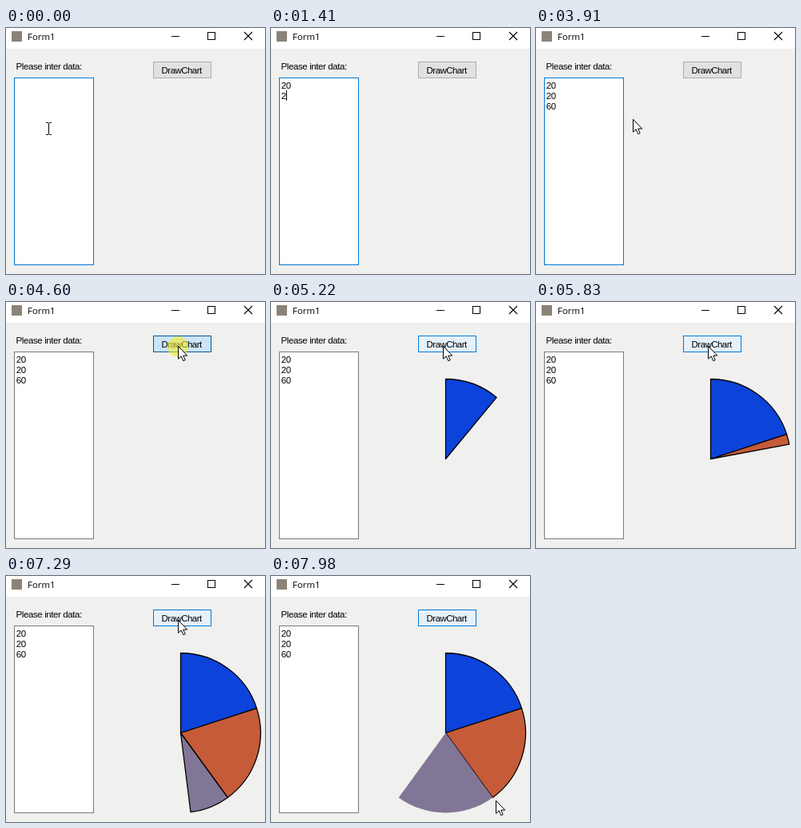
Write an HTML page with a canvas that moves like this. It is 324 by 308 pixels and loops after 8000 ms.

```html
<!DOCTYPE html>
<html lang="en">
<head>
<meta charset="utf-8">
<title>Form1</title>
<style>
  html, body { margin: 0; width: 324px; height: 308px; overflow: hidden; background: #f0f0ef; }
  canvas { display: block; }
</style>
</head>
<body>
<canvas id="stage" width="324" height="308"></canvas>
<script>
const ctx = document.getElementById('stage').getContext('2d');
const LOOP = 8000;
const TEXT_FONT = '11.5px "Liberation Sans", sans-serif';
const COLORS = ['#0b43db', '#c55b39', '#827696'];
const CENTER = [218.5, 196.5], RADIUS = 100, SLICE = 72;

// time, text, caret visible
const TYPING = [
  [0, '', false], [170, '2', true], [400, '20', true], [840, '20', false],
  [1090, '20\n', true], [1410, '20\n2', true], [1640, '20\n20', true],
  [2110, '20\n20', false], [2490, '20\n20\n', true], [2890, '20\n20\n6', true],
  [3380, '20\n20\n60', true], [3910, '20\n20\n60', false]
];

// drawing step, total sweep in degrees
const SWEEP = [[0, 0], [10, 49.5], [16, 79.4], [21, 103.3], [24, 117.7],
  [32, 158.4], [35, 172.8], [43, 213.7], [44, 218.9]];

const clamp01 = v => Math.min(1, Math.max(0, v));
const lerp = (a, b, u) => a + (b - a) * u;
const drawStep = t => Math.floor((t - 4600) / 76.8 + 0.1);

function sweepAt(step) {
  const k = SWEEP.findIndex(p => p[0] >= step);
  if (k < 0) return SWEEP[SWEEP.length - 1][1];
  if (k === 0) return 0;
  const [a, b] = [SWEEP[k - 1], SWEEP[k]];
  return lerp(a[1], b[1], (step - a[0]) / (b[0] - a[0]));
}

function box(x, y, w, h, fill, border) {
  ctx.fillStyle = border;
  ctx.fillRect(x, y, w, h);
  ctx.fillStyle = fill;
  ctx.fillRect(x + 1, y + 1, w - 2, h - 2);
}

function label(text, x, y, font = TEXT_FONT, spacing = -0.4) {
  ctx.font = font;
  ctx.letterSpacing = spacing + 'px';
  ctx.fillStyle = '#000';
  ctx.fillText(text, x, y);
}

function polyline(points, width = 1) {
  ctx.beginPath();
  points.forEach(([x, y]) => ctx.lineTo(x, y));
  ctx.lineWidth = width;
  ctx.strokeStyle = '#000';
  ctx.stroke();
}

function titleBar() {
  ctx.fillStyle = '#fff';
  ctx.fillRect(0, 0, 324, 26);
  ctx.fillStyle = '#8b8377';
  ctx.fillRect(7, 4, 13, 13);
  label('Form1', 27, 15, '11.4px "Open Sans", sans-serif', 0);
  polyline([[207, 10.5], [217, 10.5]]);
  ctx.strokeRect(252.5, 5.5, 9, 9);
  polyline([[298, 5], [308, 15]], 1.1);
  polyline([[308, 5], [298, 15]], 1.1);
}

function textBox(t) {
  box(10, 62, 100, 235, '#fff', t < 4600 ? '#0078d7' : '#7a7a7a');
  const [, text, caret] = TYPING.filter(s => s[0] <= t).pop();
  const lines = text.split('\n');
  lines.forEach((line, row) => label(line, 12.7, 76 + row * 13));
  if (caret) {
    const row = lines.length - 1;
    ctx.fillRect(13 + lines[row].length * 6, 65 + row * 13, 1, 13);
  }
}

function button(t, [x, y]) {
  const over = t >= 4600 || (x >= 184 && x < 257 && y >= 42 && y < 63);
  const pressed = t >= 4600 && t < 4750;
  if (pressed) box(184, 42, 73, 21, '#cce4f7', '#005499');
  else if (over) box(184, 42, 73, 21, '#e5f1fb', '#0078d7');
  else box(184, 42, 73, 21, '#e1e1e1', '#adadad');
  label('DrawChart', 194.6, 57, TEXT_FONT, -0.55);
}

function pie(step) {
  const total = sweepAt(step);
  const angle = deg => (deg - 90) * Math.PI / 180;
  ctx.lineWidth = 1.3;
  ctx.lineJoin = 'round';
  ctx.strokeStyle = '#000';
  COLORS.forEach((color, k) => {
    const from = k * SLICE, to = Math.min(total, from + SLICE);
    if (to <= from) return;
    ctx.beginPath();
    ctx.moveTo(...CENTER);
    ctx.arc(...CENTER, RADIUS, angle(from), angle(to));
    ctx.closePath();
    ctx.fillStyle = color;
    ctx.fill();
    // the newest fill appears before its outline on the last step
    if (k < 2 || step < 44) ctx.stroke();
  });
}

function pointerAt(t) {
  if (t < 3590) return [53.5, t < 400 ? 126 : 127];
  if (t < 4600) {
    const u = clamp01((Math.floor((t - 3590) / 78) + 1) / 11);
    const e = u * u * (3 - 2 * u), v = 1 - e;
    return [v * v * 53.5 + 2 * v * e * 130 + e * e * 215,
            v * v * 127 + 2 * v * e * 127 + e * e * 55];
  }
  const u = 1 - Math.pow(1 - clamp01((drawStep(t) - 41) / 3), 1.4);
  return [lerp(215, 281, u), lerp(55, 281, u)];
}

function iBeam(x, y) {
  ctx.fillStyle = '#000';
  ctx.fillRect(x - 0.5, y - 7, 1, 14);
  for (const dy of [-8, 7]) {
    ctx.fillRect(x - 3.5, y + dy, 3, 1);
    ctx.fillRect(x + 0.5, y + dy, 3, 1);
  }
}

function arrow(x, y) {
  const shape = [[0, 0], [0, 16], [3.7, 12.6], [6.3, 18.4], [8.7, 17.4], [6.2, 11.8], [11.2, 11.8]];
  ctx.beginPath();
  shape.forEach(([dx, dy]) => ctx.lineTo(x + 0.5 + dx, y + 0.3 + dy));
  ctx.closePath();
  ctx.fillStyle = '#fff';
  ctx.fill();
  ctx.lineWidth = 1;
  ctx.lineJoin = 'miter';
  ctx.strokeStyle = '#000';
  ctx.stroke();
}

function pointer(t, [x, y]) {
  const hidden = (t >= 170 && t < 480) || (t >= 1090 && t < 3590);
  if (hidden) return;
  if (t >= 4600 && t < 4750) {
    ctx.beginPath();
    ctx.arc(x, y + 1, 13, 0, Math.PI * 2);
    ctx.fillStyle = 'rgba(240, 236, 40, 0.6)';
    ctx.fill();
  }
  if (x < 110) iBeam(Math.floor(x) + 0.5, Math.round(y));
  else arrow(Math.round(x), Math.round(y));
}

function render(t) {
  ctx.fillStyle = '#f0f0ef';
  ctx.fillRect(0, 0, 324, 308);
  const at = pointerAt(t);
  titleBar();
  label('Please inter data:', 12.6, 52);
  textBox(t);
  button(t, at);
  if (t >= 4600) pie(drawStep(t));
  pointer(t, at);
}

const start = performance.now();
function tick() {
  render((performance.now() - start) % LOOP);
  requestAnimationFrame(tick);
}
tick();
</script>
</body>
</html>
```
